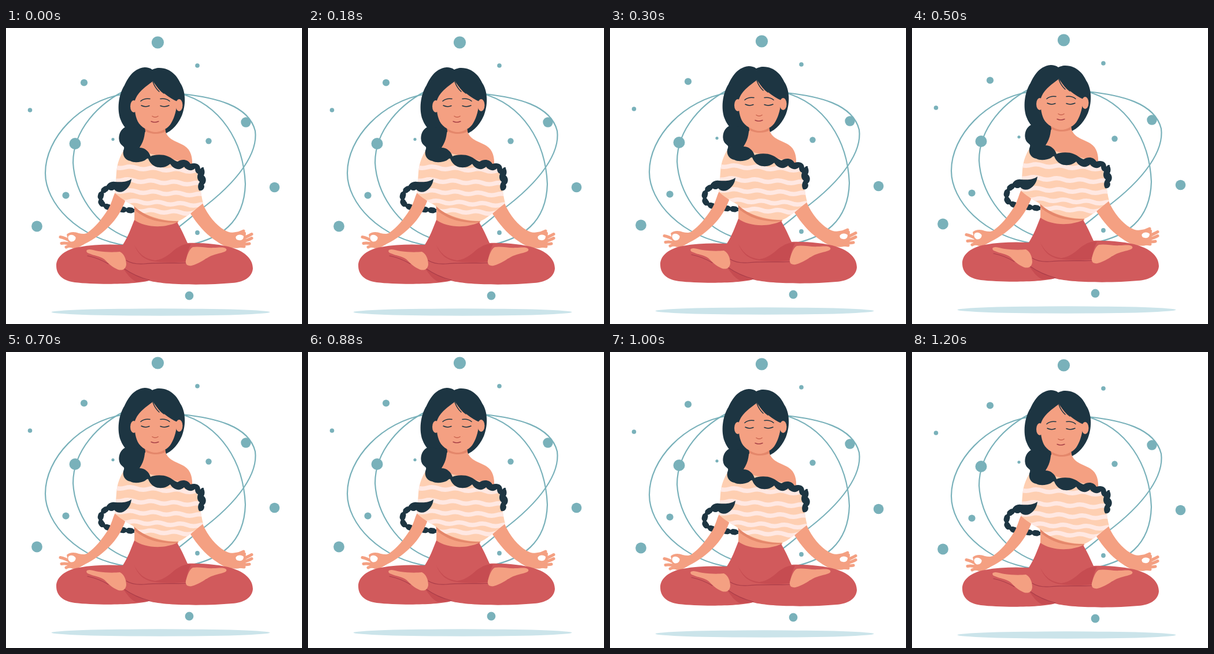
An HTML page without scripts that plays this animation: 512x512 px, repeating every 1.4 s.

```html
<!DOCTYPE html>
<html lang="en">
<head>
<meta charset="utf-8">
<title>Floating meditation</title>
<style>
  html, body { margin: 0; width: 100%; height: 100%; overflow: hidden; background: #fff; }
  svg { display: block; width: 100vw; height: 100vh; }
  .float { animation: float 1400ms step-end infinite; }
  @keyframes float {
    0%, 100% { transform: translateY(0); }
    21.4286% { transform: translateY(-2px); }
    35.7143% { transform: translateY(-4px); }
    50% { transform: translateY(-6px); }
    71.4286% { transform: translateY(-4px); }
    85.7143% { transform: translateY(-2px); }
  }
  .teal { fill: #79b1ba; }
  .orbit { fill: none; stroke: #79b1ba; stroke-width: 2.2; }
  .hair { fill: #1d3542; }
  .skin { fill: #f4a082; }
  .shade { fill: #e4876b; }
  .pants { fill: #d15a5c; }
  .fold { fill: #c64c51; }
  .seam { fill: none; stroke: #aa3d49; stroke-width: 1.2; stroke-linecap: round; }
  .line { fill: none; stroke: #1d3542; stroke-width: 1.5; stroke-linecap: round; }
  .finger { fill: none; stroke: #f4a082; stroke-width: 5; stroke-linecap: round; }
  .stripe { fill: none; stroke: #ffe8e2; stroke-width: 7.5; }
  .plait { fill: none; stroke: #1d3542; stroke-width: 6; }
  .beads { fill: none; stroke: #1d3542; stroke-width: 10; stroke-linecap: round; stroke-dasharray: 4 9; }
</style>
</head>
<body>
<svg viewBox="0 0 512 512" role="img" aria-label="Woman meditating in the air">
  <defs>
    <path id="top" d="M203 213C197 222 192 235 191 250C190 265 189 276 188 285C194 291 203 297 211 302C220 306 226 313 236 319C252 328 276 334 297 334C307 332 324 316 341 303C337 287 334 263 328 238L300 230L240 215Z"/>
    <path id="wave" d="M0 0q10 4 20 1t20 1t20 1t20 1t20 1t20 1t20 1t20 1"/>
    <path id="loop" d="M185 275C170 275 161 286 164 300C168 312 192 313 222 316"/>
    <clipPath id="knit"><use href="#top"/></clipPath>
  </defs>

  <g class="float">
    <ellipse cx="267.5" cy="491.5" rx="189" ry="6.2" fill="#cbe4ea"/>

    <path class="orbit" d="M205 114C128 126 68 190 68 251C68 302 122 364 212 377C270 376 298 344 334 316C372 288 396 263 411 241C424 222 434 200 431 178C420 133 360 120 305 114"/>
    <path class="orbit" d="M214 104C158 130 116 178 116 233C119 285 153 340 209 362C240 382 280 384 318 375C369 364 412 338 414 270C411 197 372 132 300 113"/>

    <g class="teal">
      <circle cx="262.5" cy="25" r="10.6"/>
      <circle cx="331" cy="65" r="3.8"/>
      <circle cx="135" cy="94.500" r="6.1"/>
      <circle cx="41.5" cy="142" r="3.8"/>
      <circle cx="415" cy="163" r="8.7"/>
      <circle cx="350.5" cy="195.5" r="5.2"/>
      <circle cx="185" cy="192.5" r="2.6"/>
      <circle cx="119.5" cy="200" r="10"/>
      <circle cx="464.5" cy="275.5" r="8.8"/>
      <circle cx="103.5" cy="289.5" r="6.1"/>
      <circle cx="53.5" cy="343" r="9.4"/>
      <circle cx="331" cy="354" r="3.9"/>
      <circle cx="317" cy="463" r="7.4"/>
    </g>

    <!-- back hair and the far part of the braid -->
    <path class="hair" d="M240 68C218 70 209 91 205 99C194 116 192 142 198 158C201 166 205 171 207 173C196 178 193 193 199 201C203 206 206 205 204 210L240 206L272 184C288 179 300 163 305 149C312 130 310 108 302 96C297 85 286 69 265 69C259 69 256 71 253 72C249 69 245 68 240 68Z"/>
    <use href="#loop" class="plait"/>
    <use href="#loop" class="beads"/>

    <!-- arms -->
    <path class="skin" d="M189 284C184 294 182 306 175 316C166 330 154 345 141 354C137 357 131 356 126 355C119 352 110 352 105 357C106 362 107 366 108 372C108 378 112 381 119 381C127 380 131 376 137 373C151 366 168 355 184 337C194 326 202 311 207 297Z"/>
    <path class="finger" d="M112 369Q102 363 94 361.500M112 374Q103 371 96 372.500M116 378Q109 376 104 379"/>
    <path fill="#fff" d="M107.500 361C110 356 117 357 120.500 362C121 367 116 371 111 369C108 367 107 364 107.500 361Z"/>
    <path class="skin" d="M319 321C330 338 344 355 360 366C370 373 379 379 389 380C398 382 409 380 414 376C415 370 414 363 415 354C411 350 405 352 397 353C389 355 384 353 377 349C364 341 349 325 340 303Z"/>
    <path class="finger" d="M404 354L411 351M409 364Q419 360 425 356.500M410 369Q419 367 425 363.500M407 374Q416 374 421 373M403 377L412 378"/>
    <path fill="#fff" d="M397.500 361C401 356 408 357 411 360C411 365 408 368 403 367C399 367 397 364 397.500 361Z"/>

    <!-- torso -->
    <path class="skin" d="M240 172C241 186 238 198 228 211L250 228L322 239C323 224 320 211 309 204C297 196 277 194 275 174Z"/>
    <path class="skin" d="M221 302C223 313 222 324 222 336L260 347L297 338L300 325Z"/>
    <path class="shade" d="M221 304C233 324 267 336 299 334L296 336C265 339 238 329 222 314Z"/>

    <!-- legs -->
    <path class="pants" d="M222 332C239 345 274 347 296 336C303 347 308 359 314 372C338 371 372 374 391 380C414 387 427 400 427 416C426 431 411 440 391 441C349 445 277 445 247 437C223 444 154 444 119 440C97 437 87 426 87 411C87 395 103 383 126 379C152 374 179 374 202 375C211 361 216 347 222 332Z"/>
    <path class="fold" d="M222 375C229 389 238 399 258 402C275 400 284 389 295 381C304 375 312 372 320 374C314 385 313 393 311 404C290 407 270 406 252 403C238 400 228 391 222 375Z"/>
    <path class="fold" d="M203 416C216 424 229 431 247 437L225 439C216 434 209 426 203 416Z"/>
    <path class="seam" d="M141 394Q160 398 177 408M208 402Q219 409 238 408C268 405 294 408 314 406C326 404 337 401 346 399M204 416Q224 430 248 436"/>

    <!-- feet -->
    <path class="skin" d="M140 384C146 381 152 385 160 386C174 388 187 388 197 387C205 391 208 401 208 409C207 417 202 420 194 418C184 414 177 407 170 400C162 394 152 394 144 390C140 389 138 386 140 384Z"/>
    <path class="skin" d="M381 382C377 378 367 380 360 380C347 381 334 377 323 379C316 383 313 395 311 402C310 409 314 412 321 411C333 408 342 401 351 396C360 391 371 390 378 387C381 386 382 384 381 382Z"/>

    <!-- top -->
    <use href="#top" fill="#fecfb2"/>
    <g clip-path="url(#knit)" class="stripe">
      <use href="#wave" x="186" y="240"/>
      <use href="#wave" x="182" y="262"/>
      <use href="#wave" x="186" y="281"/>
      <use href="#wave" x="193" y="299"/>
      <use href="#wave" x="222" y="315"/>
    </g>

    <!-- front braid -->
    <path class="hair" d="M207 171C194 177 193 194 199 201C204 206 206 205 203 212C201 221 207 229 215 230C222 234 234 232 240 229C243 227 244 225 246 226C249 234 256 241 265 241C273 242 279 239 284 235C290 245 301 247 308 240C313 247 322 248 327 243C327 248 329 251 332 252C330 258 331 263 335 266C332 271 331 275 334 281C341 283 345 275 342 271C347 267 347 259 342 255C345 250 343 245 342 243C343 240 339 240 336 244C336 236 329 232 319 235C315 227 304 226 297 231C291 230 288 225 280 222C271 218 256 219 250 222C247 213 240 207 231 207C233 197 238 187 243 174Z"/>
    <path class="hair" d="M217 261C207 268 197 266 188 266C181 265 175 269 173 275C177 281 184 283 187 279C194 287 203 284 209 278C214 273 216 268 217 261Z"/>

    <!-- head -->
    <path class="shade" d="M240 172C249 182 267 183 275 173L276 179C266 185 249 184 241 178Z"/>
    <ellipse class="skin" cx="221" cy="135.5" rx="6" ry="10.5"/>
    <ellipse class="skin" cx="299.500" cy="133.500" rx="6" ry="10.500"/>
    <path class="skin" d="M254 92C243 101 228 109 222.500 127C222 143 224 156 230 165C238 175 249 179 258 179C269 179 281 174 286 164C292 154 295 141 296 127C282 121 265 108 254 92Z"/>
    <path class="line" d="M254 93Q258 104 265 110M257 94Q264 106 273 113"/>
    <path class="line" stroke-width="1.8" d="M233 126.500Q239 121 249 122.500M267 122.500Q277 121 283 126.500"/>
    <path class="line" d="M234 134Q241 137.500 248 134.500M267 134.500Q274 137.500 282 134"/>
    <path d="M253 152.500Q258 156 263 152.500" fill="none" stroke="#c9634f" stroke-width="1.5" stroke-linecap="round"/>
    <path d="M251 161.500Q257 164.500 264 161.500" fill="none" stroke="#a94348" stroke-width="1.4" stroke-linecap="round"/>
  </g>
</svg>
</body>
</html>
```
